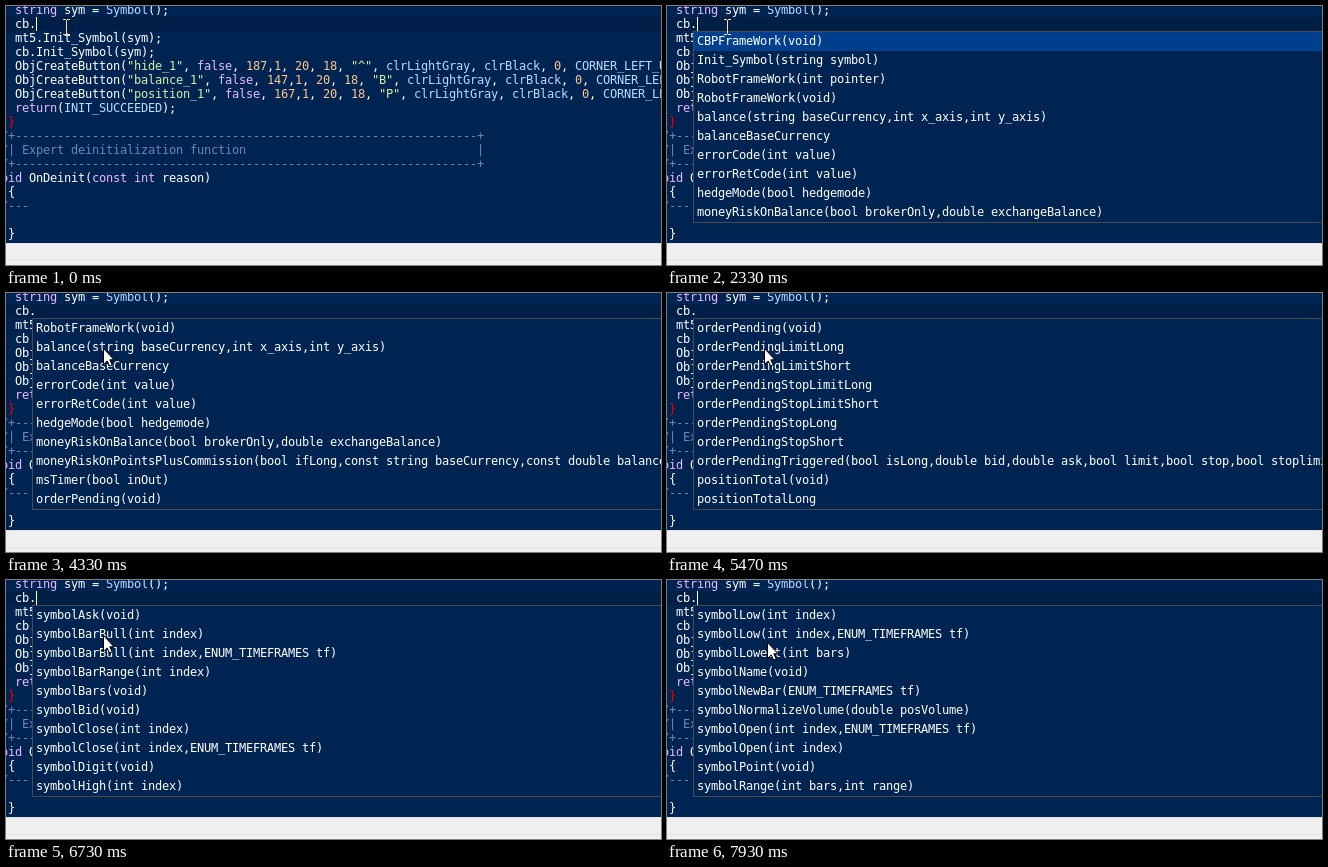
Animation of 655x259 px, one loop 8000 ms. Source, as an HTML page with a canvas:

```html
<!DOCTYPE html>
<html lang="en">
<head>
<meta charset="utf-8">
<title>Code completion</title>
<style>
html, body { margin: 0; width: 100%; height: 100%; overflow: hidden; background: #f0f0f0; }
canvas { display: block; }
</style>
</head>
<body>
<canvas id="stage" width="655" height="259"></canvas>
<script>
const ctx = document.getElementById('stage').getContext('2d');
const LOOP = 8000, CHAR = 7, LEFT = -12;
const BLUE = '#002451', WHITE = '#fff', COMMENT = '#7285b7';

// The first matching rule colours a token.
const syntax = [
  [/^"/, '#d1f1a9'],
  [/^\d/, '#ffc58f'],
  [/^(string|void|const|int|false|return)$/, '#ebbbff'],
  [/^(Symbol$|clr|CORNER_|INIT_)/, '#bbdaff'],
  [/^/, WHITE]
];

const rule = '//+' + '-'.repeat(66) + '+';
const button = (name, x, label) =>
  `   ObjCreateButton("${name}", false, ${x},1, 20, 18, "${label}", clrLightGray, clrBlack, 0, CORNER_LEFT_UPPER);`;

const code = [
  '   string sym = Symbol();',
  '',
  '   mt5.Init_Symbol(sym);',
  '   cb.Init_Symbol(sym);',
  button('hide_1', 187, '^'),
  button('balance_1', 147, 'B'),
  button('position_1', 167, 'P'),
  '   return(INIT_SUCCEEDED);',
  '  }',
  rule,
  '//| Expert deinitialization function'.padEnd(69) + '|',
  rule,
  'void OnDeinit(const int reason)',
  '  {',
  '//---',
  '',
  '  }'
];

const bar = '(int index)', barTf = '(int index,ENUM_TIMEFRAMES tf)';
const members = [
  'CBPFrameWork(void)',
  'Init_Symbol(string symbol)',
  'RobotFrameWork(int pointer)',
  'RobotFrameWork(void)',
  'balance(string baseCurrency,int x_axis,int y_axis)',
  'balanceBaseCurrency',
  'errorCode(int value)',
  'errorRetCode(int value)',
  'hedgeMode(bool hedgemode)',
  'moneyRiskOnBalance(bool brokerOnly,double exchangeBalance)',
  'moneyRiskOnPointsPlusCommission(bool ifLong,const string baseCurrency,const double balance)',
  'msTimer(bool inOut)',
  'orderPending(void)',
  'orderPendingLimitLong',
  'orderPendingLimitShort',
  'orderPendingStopLimitLong',
  'orderPendingStopLimitShort',
  'orderPendingStopLong',
  'orderPendingStopShort',
  'orderPendingTriggered(bool isLong,double bid,double ask,bool limit,bool stop,bool stoplimit)',
  'positionTotal(void)',
  'positionTotalLong',
  'positionTotalShort',
  'positionTriggered(bool isLong,double bid,double ask,bool stopLoss,bool takeProfit,int index)',
  'positionVolume(void)',
  'positionVolumeLong',
  'positionVolumeShort',
  'setDeviation(int points)',
  'setMagicNumber(int magic)',
  'setOrderFilling(int type)',
  'setStopLoss(double price)',
  'setTakeProfit(double price)',
  'setVolume(double volume)',
  'symbolAsk(void)',
  'symbolBarBull' + bar,
  'symbolBarBull' + barTf,
  'symbolBarRange' + bar,
  'symbolBars(void)',
  'symbolBid(void)',
  'symbolClose' + bar,
  'symbolClose' + barTf,
  'symbolDigit(void)',
  'symbolHigh' + bar,
  'symbolHigh' + barTf,
  'symbolHighest(int bars)',
  'symbolLow' + bar,
  'symbolLow' + barTf,
  'symbolLowest(int bars)',
  'symbolName(void)',
  'symbolNewBar(ENUM_TIMEFRAMES tf)',
  'symbolNormalizeVolume(double posVolume)',
  'symbolOpen' + barTf,
  'symbolOpen' + bar,
  'symbolPoint(void)',
  'symbolRange(int bars,int range)'
];

// Each wheel notch scrolls three rows; each toggle flips the caret.
const notches = [4330, 4800, 5000, 5470, 5530, 5600, 5800, 6270, 6400, 6600, 6730, 7130, 7270, 7530, 7930];
const toggles = [270, 800, 1270, 1330, 2930, 3400, 3930, 4470, 5000, 5530, 6070, 6600, 7130, 7670];
const pointerPath = [[3070, 60, 20], [3330, 84, 37], [3930, 97, 55], [7270, 97, 55], [7730, 100, 62]];

const passed = (times, t) => times.filter(time => time <= t).length;

function rect(color, x, y, w, h) {
  ctx.fillStyle = color;
  ctx.fillRect(x, y, w, h);
}

function text(value, x, baseline, color = WHITE) {
  ctx.fillStyle = color;
  ctx.fillText(value, x, baseline);
}

// Keeps the editor's whole-pixel character grid.
function setFont() {
  ctx.font = '12px "DejaVu Sans Mono", monospace';
  ctx.letterSpacing = '0px';
  ctx.letterSpacing = CHAR - ctx.measureText('0').width + 'px';
}

function pointerAt(t) {
  const next = pointerPath.findIndex(p => p[0] > t);
  if (next === 0) return pointerPath[0].slice(1);
  if (next < 0) return pointerPath.at(-1).slice(1);
  const [t0, x0, y0] = pointerPath[next - 1], [t1, x1, y1] = pointerPath[next];
  const k = (t - t0) / (t1 - t0);
  return [Math.round(x0 + (x1 - x0) * k), Math.round(y0 + (y1 - y0) * k)];
}

function drawCodeLine(line, row) {
  const baseline = 8 + row * 14;
  if (line.startsWith('//')) return text(line, LEFT, baseline, COMMENT);
  if (row === 8) return text(line, LEFT, baseline, '#f00000');
  for (const match of line.matchAll(/"[^"]*"|\w+|[^\w"]+/g)) {
    const color = syntax.find(([pattern]) => pattern.test(match[0]))[1];
    text(match[0], LEFT + match.index * CHAR, baseline, color);
  }
}

function drawPopup(t) {
  const top = 3 * passed(notches, t);
  rect('#484c50', 26, 25, 629, 192);
  rect(BLUE, 27, 26, 628, 190);
  if (top === 0) rect('#003f8e', 27, 26, 628, 19);
  members.slice(top, top + 10).forEach((name, i) => text(name, 30, 39 + i * 19));
}

function drawBeam(x, y) {
  const color = '#ffdbae';
  rect(color, x, y - 6, 1, 14);
  for (const end of [y - 7, y + 8]) {
    rect(color, x - 3, end, 3, 1);
    rect(color, x + 1, end, 3, 1);
  }
}

function drawArrow(x, y) {
  ctx.save();
  ctx.translate(x, y);
  const shape = new Path2D('M.5.5V16.5L4.2 13L6.7 18L9.2 17L6.8 11.8H11Z');
  ctx.fillStyle = WHITE;
  ctx.fill(shape);
  ctx.strokeStyle = '#000';
  ctx.lineWidth = 1;
  ctx.stroke(shape);
  ctx.restore();
}

function draw(t) {
  rect(BLUE, 0, 0, 655, 237);
  rect('#001f46', 0, 11, 655, 14);
  rect('#f0f0f0', 0, 237, 655, 22);
  rect('#e3e3e3', 0, 237, 655, 1);
  rect('#e3e3e3', 0, 254, 655, 1);
  code.forEach(drawCodeLine);

  const dotted = t < 1270 || t >= 2270;
  text(dotted ? 'cb.' : 'cb', 9, 22);
  if (t >= 2330) drawPopup(t);
  if (passed(toggles, t) % 2 === 0) rect(WHITE, dotted ? 30 : 23, 11, 1, 14);

  // The pointer is sampled fifteen times a second.
  const [x, y] = pointerAt(Math.floor((t + 5) * 0.015) / 0.015);
  if (y < 26) drawBeam(x, y);
  else drawArrow(x, y);
}

setFont();
const start = performance.now();
function tick() {
  draw((performance.now() - start) % LOOP);
  requestAnimationFrame(tick);
}
tick();
</script>
</body>
</html>
```
